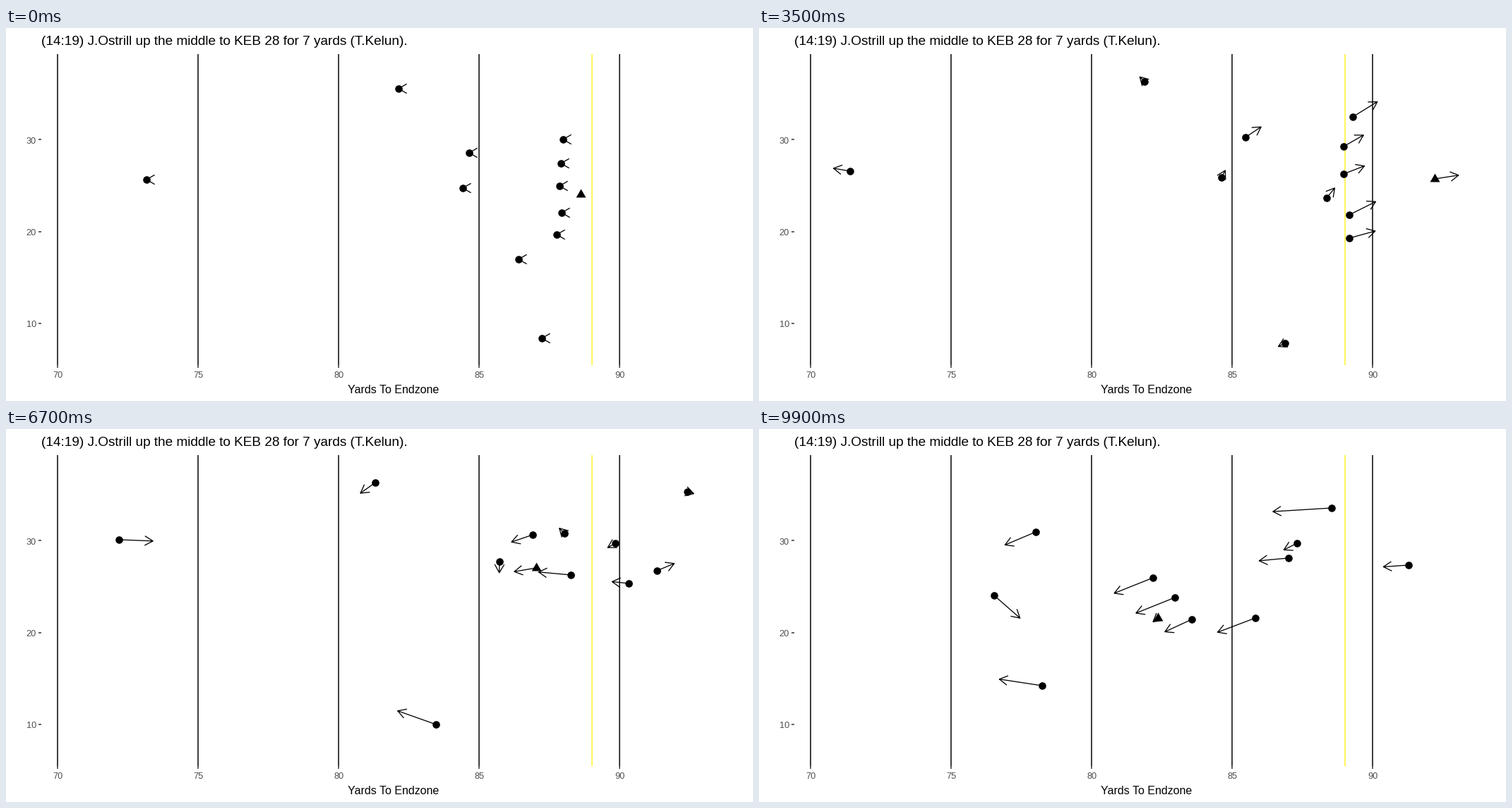
These frames come from a looping animation (1058x529 px, 10 s). A matplotlib script:

```python
import numpy as np
import matplotlib.pyplot as plt
from matplotlib.animation import FuncAnimation
from matplotlib.patches import Polygon

W, H, DPI = 1058, 529, 64
PT = 72 / DPI                        # points per pixel
FRAMES, INTERVAL = 100, 100
TOP, BOTTOM, LEFT = 37, 478, 50      # panel edges in pixels
HEAD, SPREAD = 13.4, np.radians(30)  # arrowhead arm length and half angle
KEYS = (35, 51, 67, 80, 99)


class Mover:
    """Accelerates from rest to the first key, then follows a smooth spline.

    The arrow is the velocity, scaled by `reach`.
    """

    def __init__(self, rest, *points, keys=KEYS, start=0, power=2.6, reach=9):
        self.rest, self.p = np.array(rest, float), np.array(points, float)
        self.k = np.array(keys, float)
        self.start, self.power, self.reach = start, power, reach
        m = np.gradient(self.p, self.k, axis=0)
        m[0] = power * (self.p[0] - self.rest) / (self.k[0] - start)
        m[-1] = 1.5 * m[-1] - .5 * m[-2]    # natural end
        self.m = m

    def launch(self, t):
        span = self.k[0] - self.start
        u = max(t - self.start, 0) / span
        d = self.p[0] - self.rest
        return (self.rest + d * u ** self.power,
                d * self.power * u ** (self.power - 1) / span)

    def spline(self, t):
        i = min(np.searchsorted(self.k, t, side="right") - 1, len(self.k) - 2)
        h = self.k[i + 1] - self.k[i]
        u = (t - self.k[i]) / h
        d = self.p[i + 1] - self.p[i]
        a, b = h * self.m[i], h * self.m[i + 1]
        c2, c3 = 3 * d - 2 * a - b, a + b - 2 * d
        pos = self.p[i] + u * (a + u * (c2 + u * c3))
        return pos, (a + u * (2 * c2 + 3 * u * c3)) / h

    def at(self, t):
        pos, vel = self.launch(t) if t < self.k[0] else self.spline(t)
        return pos, vel * self.reach


defenders = [
    # deep safety and outside corners
    Mover((199, 215), (129, 203), (98, 180), (160, 157), (245, 177), (333, 236),
          power=1.3),
    Mover((556, 86), (546, 76), (538, 62), (523, 76), (478, 106), (392, 146)),
    Mover((759, 440), (745, 447), (700, 450), (609, 419), (527, 389), (401, 364)),
    # linebackers
    Mover((656, 177), (689, 155), (753, 138), (746, 150), (672, 169), (558, 211)),
    Mover((647, 227), (655, 212), (673, 186), (699, 188), (681, 228), (613, 270)),
    Mover((726, 328), (836, 298), (871, 247), (882, 219), (813, 231), (703, 268),
          power=1.3),
    # front line
    Mover((789, 158), (841, 126), (908, 95), (965, 89), (951, 100), (811, 112)),
    Mover((786, 192), (828, 168), (854, 154), (863, 162), (829, 173), (750, 183)),
    Mover((784, 224), (828, 207), (821, 175), (791, 148), (792, 147), (762, 162)),
    Mover((787, 262), (804, 241), (843, 219), (800, 207), (709, 204), (589, 239)),
    Mover((780, 293), (836, 265), (889, 228), (922, 201), (964, 192), (920, 193)),
]
ball = Mover((814, 236), (957, 214), (986, 200), (948, 184), (751, 197),
             (637, 230), (565, 268), keys=(35, 43, 51, 67, 80, 99),
             start=16, power=1.5, reach=3)


def arrow(pos, vec):
    """Open-headed arrow; one of no length points left."""
    still = np.hypot(*vec) < 1e-6
    angle = np.pi if still else np.arctan2(vec[1], vec[0])
    tip = pos + vec
    arms = [tip - HEAD * np.array([np.cos(a), np.sin(a)])
            for a in (angle - SPREAD, angle + SPREAD)]
    gap = (np.nan, np.nan)
    return [pos, tip, gap, arms[0], tip, arms[1], gap]


plt.rcParams["font.family"] = "Liberation Sans"
fig = plt.figure(figsize=(W / DPI, H / DPI), dpi=DPI, facecolor="white")
ax = fig.add_axes([0, 0, 1, 1])
ax.set_xlim(0, W)
ax.set_ylim(H, 0)
ax.axis("off")


def line(xs, ys, color, width=1.5, z=1):
    ax.plot(xs, ys, color=color, lw=width * PT, solid_capstyle="butt", zorder=z)


def label(x, y, s, px, color="black", ha="center"):
    ax.text(x, y, s, fontsize=px * PT, color=color, ha=ha, va="baseline")


for i in range(5):
    x = 73 + 199.1 * i
    line([x, x], [TOP, BOTTOM], "black")
    line([x, x], [BOTTOM, BOTTOM + 4], "#333333")
    label(x, 496.5, str(70 + 5 * i), 12.8, "#4d4d4d")
for i in range(3):
    y = 158.2 + 130.3 * i
    line([LEFT - 4, LEFT], [y, y], "#333333")
    label(43, y + 5.3, str(30 - 10 * i), 12.8, "#4d4d4d", "right")
line([830, 830], [TOP, BOTTOM], "#fff55f", 2, 2)

label(50.5, 23.5, "(14:19) J.Ostrill up the middle to KEB 28 for 7 yards (T.Kelun).",
      19, ha="left")
label(549, 518, "Yards To Endzone", 16)

dots = ax.scatter([], [], s=(10.6 * PT) ** 2, c="black", linewidths=0, zorder=4)
dots.set_snap(False)
arrows, = ax.plot([], [], color="black", lw=1.3 * PT, solid_capstyle="butt",
                  solid_joinstyle="round", zorder=3)
triangle = 8 * np.array([(0, -1), (.866, .5), (-.866, .5)]) + .5
marker = ax.add_patch(Polygon(triangle, color="black", lw=0, zorder=4))


def draw(t):
    states = [d.at(t) for d in defenders]
    dots.set_offsets([pos for pos, _ in states])
    carried = ball.at(t)
    marker.set_xy(triangle + carried[0])
    if t > ball.start:
        states.append(carried)
    pts = np.array([p for s in states for p in arrow(*s)])
    arrows.set_data(pts[:, 0], pts[:, 1])
    return dots, arrows, marker


anim = FuncAnimation(fig, draw, frames=FRAMES, interval=INTERVAL, repeat=True,
                     repeat_delay=0, init_func=lambda: draw(0))
plt.show()
```
